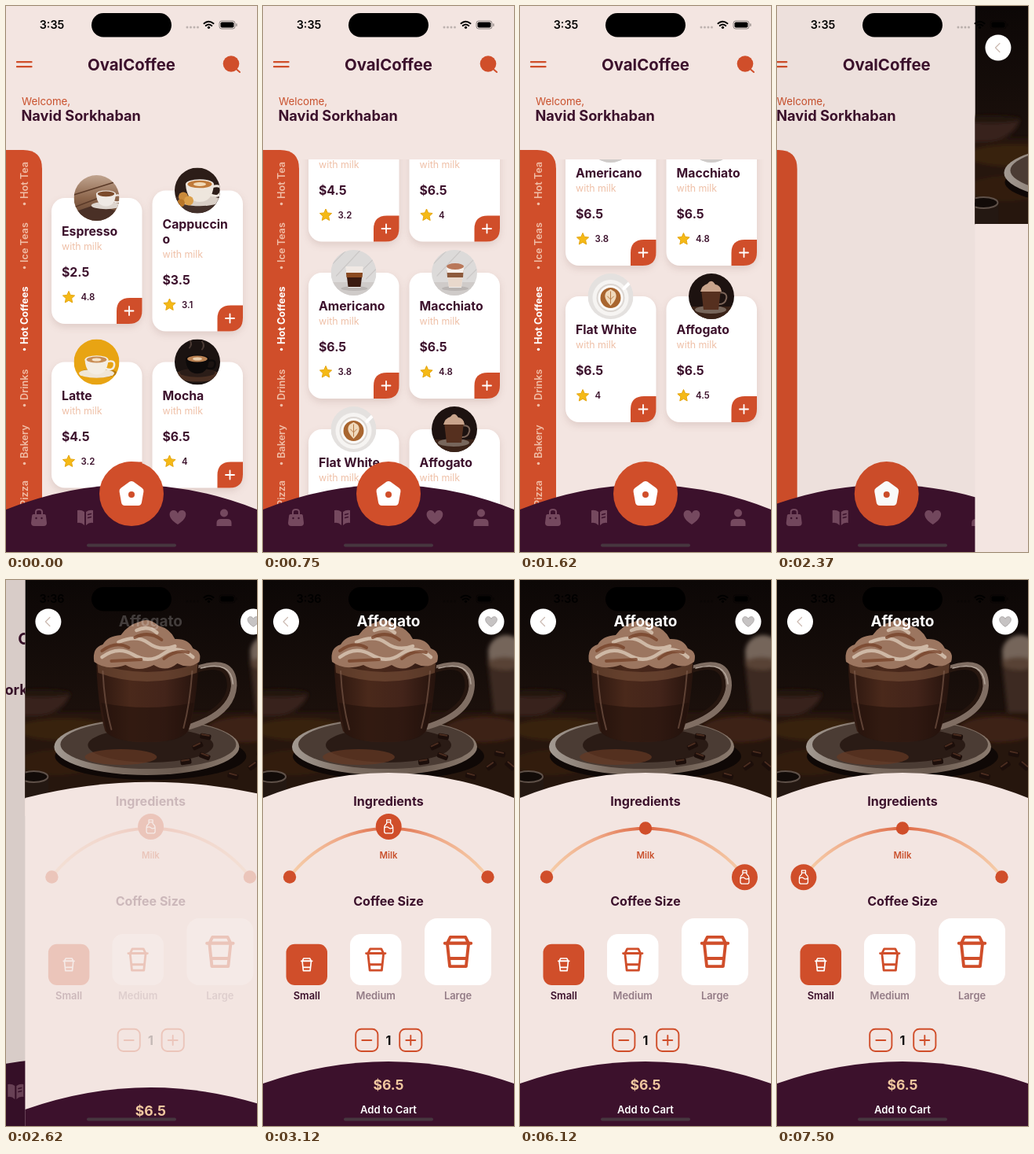
Animation of 320x694 px, one loop 8 s. Source, as an HTML page:

```html
<!DOCTYPE html>
<html lang="en">
<head>
<meta charset="utf-8">
<title>Coffee shop app</title>
<style>
html, body { margin: 0; width: 100%; height: 100%; overflow: hidden; background: #f3e5e1; }
svg { display: block; width: 100vw; height: 100vh; font-family: Inter, "Open Sans", sans-serif; }
.card { filter: drop-shadow(0 4px 5px rgba(90, 40, 30, .13)); }
.line { fill: none; stroke-linecap: round; stroke-linejoin: round; }
</style>
</head>
<body>
<svg id="stage" viewBox="0 0 320 694" xmlns="http://www.w3.org/2000/svg"></svg>
<script>
const LOOP = 8000, STEP = 125;
const PINK = '#f3e5e1', ORANGE = '#d04e2a', PLUM = '#3c112c', PEACH = '#efc0a8';

const text = (x, y, str, size, weight, fill, anchor = 'start', id = '') =>
  `<text ${id && `id="${id}"`} x="${x}" y="${y}" font-size="${size}" font-weight="${weight}" fill="${fill}" text-anchor="${anchor}">${str}</text>`;
const rect = (x, y, w, h, r, fill, more = '') =>
  `<rect x="${x}" y="${y}" width="${w}" height="${h}" rx="${r}" fill="${fill}" ${more}/>`;
const circle = (x, y, r, fill, more = '') => `<circle cx="${x}" cy="${y}" r="${r}" fill="${fill}" ${more}/>`;
const oval = (x, y, rx, ry, fill, more = '') =>
  `<ellipse cx="${x}" cy="${y}" rx="${rx}" ry="${ry}" fill="${fill}" ${more}/>`;
const shape = (d, fill, more = '') => `<path d="${d}" fill="${fill}" ${more}/>`;
const line = (d, color, width, more = '') =>
  `<path class="line" d="${d}" stroke="${color}" stroke-width="${width}" ${more}/>`;
const at = (x, y, inner, more = '') => `<g transform="translate(${x} ${y}) ${more}">${inner}</g>`;
const gradient = (id, dir, ...stops) => `<linearGradient id="${id}" ${dir}>` + stops.map((c, i) =>
  `<stop offset="${i / (stops.length - 1)}" stop-color="${c}"/>`).join('') + '</linearGradient>';

// Small pictures, drawn around 0,0 in a disc of radius 29
const cup = (x, y, s, body, coffee, plate) => at(x, y,
  oval(0, 10, 18, 4.5, plate) +
  line('M11 -2q8 -2 7 4t-9 3', body, 2) +
  shape('M-12 -4Q-11 11 0 11T12 -4z', body) +
  oval(0, -4, 12, 4.2, body) + oval(0, -4, 10.3, 3.2, coffee), `scale(${s})`);
const glass = (low, mid, foam) =>
  oval(1, 20, 17, 3, '#b9b4b2') +
  shape('M-10 -7H12L9 19H-7z', '#eeeceb') +
  shape('M-9.4 -1H11.4L9 18H-7z', low) +
  shape('M-9.6 -3H11.6L11 6H-9z', mid) +
  shape('M-10 -8H12L11.5 0H-9.5z', foam);
const wall = rect(-29, -29, 58, 58, 0, '#dcdad9') + rect(-29, 12, 58, 17, 0, '#cfcbc9') +
  line('M-26 -12L-10 -28M-22 4L8 -28M12 -4L28 -20M16 8L28 -4', '#cbc8c7', 1.2);
const art = {
  Espresso: rect(-29, -29, 58, 58, 0, 'url(#wood)') +
    line('M-29 -4L29 -22M-29 12L8 -2M-24 24L10 9', '#5b3a28', 1.5) +
    shape('M-29 18L0 8L29 18V29H-29z', '#4a3026') + cup(12, -1, 1.05, '#efe9e4', '#7b4a2b', '#ddd5ce'),
  Cappuccino: rect(-29, -29, 58, 58, 0, '#2c1d18') + rect(-29, 8, 58, 21, 0, '#43302a') +
    cup(3, -2, 1.5, '#eee6dd', '#c07a3a', '#d9cfc6') + oval(3, -8, 8, 2.5, '#f1d9b6') +
    circle(-18, 8, 6, '#c98a3b') + circle(-11, 13, 6, '#dba04b') + circle(-21, 16, 5, '#b87629'),
  Latte: rect(-29, -29, 58, 58, 0, '#e8a413') + oval(2, 14, 24, 6, '#b97c0d') +
    cup(0, 2, 1.25, '#f4ede2', '#c98e55', '#f0e6d6') + oval(0, -3, 6, 2, '#f5e3c8'),
  Mocha: rect(-29, -29, 58, 58, 0, '#1b1311') + oval(0, 17, 29, 8, '#4a2f22') +
    line('M-10 -18q4 -5 0 -10M6 -16q4 -5 0 -10', '#4a3a34', 2) +
    cup(0, 1, 1.25, '#0d0a0a', '#b98152', '#2b1d18') + oval(0, -4, 6, 2, '#e9cfae'),
  Americano: wall + glass('#3a1a10', '#8b4a20', '#f0e9e4'),
  Macchiato: wall + glass('#e8d8cc', '#8d5a3c', '#f6f0ec') + oval(1, -8, 11, 4, '#b9785a'),
  'Flat White': rect(-29, -29, 58, 58, 0, '#e4e1df') + circle(0, 2, 23, '#f6f4f2') +
    line('M17 -10l9 -9', '#fff', 4) + circle(0, 2, 18, '#dcd7d3') + circle(0, 2, 16, '#fbfaf9') +
    circle(0, 2, 13, '#a9652f') + shape('M0 12Q-11 1 -5 -6L0 -9L5 -6Q11 1 0 12', '#f0d9bb') +
    line('M0 -6V9M-4 0l4 4l4 -4', '#b87a45', 1),
  Affogato: rect(-29, -29, 58, 58, 0, '#1d1210') + rect(-29, 13, 58, 16, 0, '#3b2318') +
    oval(-1, 17, 20, 5, '#77665b') + line('M10 -5q11 0 9 8t-11 7', '#7b6458', 2) +
    shape('M-13 -9H12L9 17H-10z', '#56301f') + shape('M-14 -6Q-12 -14 -5 -16Q0 -23 5 -15Q12 -14 13 -6z', '#c9a48c')
};

const starPath = 'M' + Array.from({ length: 10 }, (_, i) => {
  const r = i % 2 ? 3.8 : 8, a = i * Math.PI / 5;
  return (r * Math.sin(a)).toFixed(2) + ' ' + (-r * Math.cos(a)).toFixed(2);
}).join('L') + 'z';

function card(x, y, lines, price, rating) {
  const extra = (lines.length - 1) * 19, top = y - extra / 2, h = 160 + extra;
  return at(x, top,
    rect(0, 0, 115.5, h, 17, '#fff', 'class="card"') +
    at(0, h, shape('M83 0V-16Q83 -33 100 -33H115.5V-17Q115.5 0 98.5 0z', ORANGE) +
      line('M93.5 -16.5h11M99 -22v11', '#fff', 1.8)) +
    `<g transform="translate(57.5 0)" clip-path="url(#disc)">${art[lines.join('')]}</g>` +
    lines.map((s, i) => text(13, 48 + i * 19, s, 15.8, 700, PLUM)).join('') +
    at(13, extra,
      text(0, 66, 'with milk', 12.4, 400, PEACH) +
      text(0, 100, price, 15.8, 700, PLUM) +
      at(9, 126.5, shape(starPath, '#f5b916', 'stroke="#e5a610" stroke-width="1" stroke-linejoin="round"')) +
      text(24.5, 130, rating, 11.4, 600, PLUM)));
}

const menu = [
  [['Espresso'], '$2.5', '4.8'], [['Cappuccin', 'o'], '$3.5', '3.1'],
  [['Latte'], '$4.5', '3.2'], [['Mocha'], '$6.5', '4'],
  [['Americano'], '$6.5', '3.8'], [['Macchiato'], '$6.5', '4.8'],
  [['Flat White'], '$6.5', '4'], [['Affogato'], '$6.5', '4.5']
];
const rows = [244, 452.5, 652, 851];
const cards = menu.map((m, i) => card(i % 2 ? 186.5 : 58, rows[i >> 1], ...m)).join('');

const tabs = [['Hot Tea', 245], ['Ice Teas', 326], ['Hot Coffees', 430], ['Drinks', 501], ['Bakery', 575], ['Pizza', 636]]
  .map(([name, y]) => {
    const on = name === 'Hot Coffees', color = on ? '#fff' : '#f0bda6';
    return at(28, y, text(0, 0, name, 12.7, on ? 700 : 600, color), 'rotate(-90)') + circle(23.5, y + 6.5, 1.8, color);
  }).join('');

const heart = 'M0 9C-16 -1 -10 -10 -5 -9Q-1.5 -9 0 -5Q1.5 -9 5 -9C10 -10 16 -1 0 9z';
const faded = '#75495f';
const nav = shape('M0 640Q160 577 320 640V694H0z', PLUM) +
  at(42, 650,
    shape('M-7 -4H7Q9 -4 9 -1L10 7Q10 11 6 11H-6Q-10 11 -10 7L-9 -1Q-9 -4 -7 -4', faded) +
    line('M-4 -4V-7Q-4 -10 0 -10T4 -7V-4', faded, 2) +
    circle(-3.5, 1, 1.2, PLUM) + circle(3.5, 1, 1.2, PLUM)) +
  at(101, 650,
    shape('M-1 -7Q-5 -10 -10 -9V7Q-5 6 -1 10zM1 -7Q5 -10 10 -9V7Q5 6 1 10z', faded) +
    line('M3.5 -3.5L7.5 -4.5M3.5 .5L7.5 -.5', PLUM, 1.3)) +
  at(219, 650, shape(heart, faded)) +
  at(278, 650, circle(0, -5.5, 5, faded) + shape('M-9.5 11V7Q-9.5 2 -4 2H4Q9.5 2 9.5 7V11z', faded)) +
  circle(160, 620, 41, ORANGE) +
  shape('M160 608.5L171 616.5L168.5 630.5H151.5L149 616.5z', '#fff', 'stroke="#fff" stroke-width="9" stroke-linejoin="round"') +
  circle(160, 621, 4, ORANGE);

const home = rect(0, 0, 320, 694, 0, PINK) +
  `<g id="listBox" clip-path="url(#listClip)"><g id="list">${cards}</g></g>` +
  shape('M0 183H22Q46 183 46 207V694H0z', ORANGE) + `<g id="tabs">${tabs}</g>` +
  line('M14 71.2H32.5M14 77.2H32.5', ORANGE, 2.3) +
  text(160, 82, 'OvalCoffee', 20.4, 700, PLUM, 'middle') +
  circle(287, 73.5, 10.3, ORANGE) + line('M294.5 81L298 84', ORANGE, 2) +
  text(20, 126, 'Welcome,', 13.3, 400, '#c9502c') +
  text(19.5, 146, 'Navid Sorkhaban', 18.2, 700, PLUM) + nav;

const bean = (x, y, a) => at(x, y, rect(-7, -3.5, 14, 7, 2, '#1c0e0a') + rect(-6, -3, 11, 2, 1, '#4a2c1f'), `rotate(${a})`);
const room = rect(-10, 168, 340, 120, 0, '#25140d') +
  oval(50, 190, 60, 14, '#38200f') + oval(282, 190, 50, 16, '#3c2113') + oval(40, 232, 50, 16, '#321c11') +
  shape('M-12 144H58Q48 170 16 172H-12z', '#37211a') + oval(20, 144, 38, 5, '#21130d') +
  shape('M286 98H330V168H294z', '#3d2c23') + oval(310, 92, 23, 22, '#75655a') + oval(308, 106, 21, 8, '#594234');
const saucer = oval(160, 224, 122, 30, '#0f0806') +
  oval(155, 212, 118, 36, 'url(#china)') + oval(157, 209, 112, 31, '#4b3c34') +
  oval(160, 210, 80, 22, '#2a1b15') + oval(122, 225, 46, 10, '#673a24', 'opacity=".7"');
const mug = line('M216 114Q266 96 266 134Q264 170 210 186', '#806e63', 8) +
  line('M217 116Q260 101 260 135Q257 164 211 180', '#26160f', 5) +
  line('M224 112Q263 102 265 132', '#b5a79c', 1.5) +
  shape('M90 90H222Q219 160 208 192Q196 206 155 206T102 192Q92 160 90 90z', 'url(#cocoa)') +
  shape('M92 106Q155 128 220 106L219 118Q155 140 93 118z', '#795039', 'opacity=".6"') +
  shape('M97 156Q155 168 215 156Q210 190 205 195Q195 206 155 206T104 194z', '#1f0f0a', 'opacity=".55"') +
  line('M99 116Q101 158 110 190M213 116Q210 158 202 188', '#80604f', 2, 'opacity=".6"');
const cream = shape('M88 104Q85 86 99 82Q105 71 122 70Q131 57 146 53Q158 47 170 58Q185 62 191 75Q208 74 214 87Q226 91 222 104Q209 114 194 106Q180 118 164 108Q145 118 128 108Q104 116 88 104z', '#9c7660') +
  line('M98 98Q118 83 138 95T176 94T214 98M119 79Q142 69 157 80T191 84M142 64Q157 57 168 67', '#d8c4b2', 4.5, 'opacity=".85"') +
  line('M98 90Q116 77 132 86M140 73Q158 64 174 76M177 100Q192 88 208 92M110 103L148 101', '#753f26', 4, 'opacity=".75"');
const hero = '<g clip-path="url(#heroClip)">' + rect(0, 0, 320, 278, 0, 'url(#night)') +
  `<g filter="url(#soft)">${room}</g>` +
  shape('M-4 250V280H30V250z', '#241812') + oval(11, 250, 18, 7, '#120b08', 'stroke="#5e5048" stroke-width="2"') +
  saucer + mug + cream +
  bean(230, 199, 10) + bean(220, 211, -25) + bean(205, 231, -8) + bean(229, 224, 20) +
  bean(291, 236, -35) + bean(302, 221, 12) + bean(265, 249, 15) + bean(315, 236, 40) + '</g>';

const takeaway = (x, y, s, color) => at(x, y,
  line('M-5.2 -10H5.2L7.2 -6H-7.2zM-9 -5.8H9M-7.3 -5.8L-5.6 10H5.6L7.3 -5.8M-6.2 4.6H6.2', color, 2.1), `scale(${s})`);
const sizeCard = (x, y, w, r, fill, ink, s, name, color) =>
  rect(x, y, w, 515 - y, r, fill) + takeaway(x + w / 2, (y + 515) / 2, s, ink) +
  text(x + w / 2, 533, name, 12.9, 600, color, 'middle');
const stepper = (x, d) => rect(x, 570.8, 28.2, 28.2, 7, 'none', `stroke="${ORANGE}" stroke-width="1.9"`) +
  at(x + 14.1, 585, line(d, ORANGE, 1.9));

const content = text(160, 287, 'Ingredients', 16.1, 700, PLUM, 'middle') +
  line('M34 377.5A160 160 0 0 1 286.5 377.5', 'url(#arc)', 4) +
  circle(34, 377.5, 8.2, ORANGE) + circle(160, 315.5, 8.2, ORANGE) + circle(286.5, 377.5, 8.2, ORANGE) +
  '<g id="thumb">' + circle(0, 0, 16.5, ORANGE) +
  line('M-2.5 -8.5H2.5V-5.5H-2.5zM-2.5 -5.5V-4Q-5.5 -1.5 -5.5 1V6Q-5.5 8.5 -3 8.5H3Q5.5 8.5 5.5 6V1Q5.5 -1.5 2.5 -4V-5.5M-5.3 1.5Q-2 -.5 0 1.5T5.3 1.5', '#fff', 1.3) + '</g>' +
  text(160, 354, 'Milk', 11.4, 600, '#c9502c', 'middle') +
  text(160, 414, 'Coffee Size', 16, 700, PLUM, 'middle') +
  sizeCard(29.5, 462.7, 52.5, 11, ORANGE, '#fff', .78, 'Small', PLUM) +
  sizeCard(111, 450, 65.5, 14, '#fff', ORANGE, 1.36, 'Medium', '#937b86') +
  sizeCard(206, 430, 85, 16, '#fff', ORANGE, 1.86, 'Large', '#937b86') +
  stepper(118.2, 'M-6 0H6') + stepper(174.2, 'M-6 0H6M0 -6V6') +
  text(160, 590.5, '1', 16, 700, '#111', 'middle');

const detail = rect(0, 0, 320, 694, 0, PINK) + hero +
  `<path id="panel" fill="${PINK}"/>` +
  `<g id="content">${content}</g>` +
  text(160, 59, 'Affogato', 19, 700, '#fff', 'middle', 'title') +
  circle(29.5, 53, 16.5, '#fff') + line('M31.5 47.5L26 53L31.5 58.5', '#cbb9b0', 1.2) +
  circle(291, 53, 16.5, '#fff') + at(291, 53, shape(heart, '#c6c3c3', 'stroke="#aaa6a6" stroke-width="1.4" transform="scale(.7)"')) +
  '<g id="cart">' + shape('M0 640Q160 584 320 640V700H0z', PLUM) +
  text(160, 648, '$6.5', 17.6, 700, '#f0c79f', 'middle') +
  text(160, 678, 'Add to Cart', 13.1, 600, '#fff', 'middle') + '</g>';

const status = text(58.5, 29, '3:35', 14.3, 600, '#000', 'middle', 'clock') +
  rect(109, 9, 102, 30.5, 15.2, '#000') +
  [231, 235.5, 240, 244.5].map(x => circle(x, 27, 1.5, '#000', 'opacity=".22"')).join('') +
  line('M252.5 22.2Q258.5 17.2 264.5 22.2M254.8 25Q258.5 22 262.2 25', '#000', 2) + circle(258.5, 27.3, 1.6, '#000') +
  rect(272, 19, 20, 10, 3, 'none', 'stroke="#000" stroke-opacity=".42"') + rect(273.5, 20.5, 17, 7, 1.8, '#000') +
  rect(293.3, 22.2, 1.3, 3.6, .6, '#000', 'opacity=".42"') +
  rect(103, 683.5, 114, 4, 2, '#47363f');

document.getElementById('stage').innerHTML = '<defs>' +
  gradient('wood', 'x2="0" y2="1"', '#c0a48f', '#8d664c', '#5c3d2d') +
  gradient('night', 'x2="0" y2="1"', '#0c0706', '#140c09', '#1d110c', '#140b08') +
  gradient('cocoa', '', '#2a150e', '#4a291b', '#43241a', '#24120c') +
  gradient('china', '', '#a39a92', '#7b6c61', '#6b5b50', '#8b7b6f') +
  gradient('arc', '', '#f6cfab', '#efa987', '#dd6642', '#efa987', '#f6cfab') +
  '<clipPath id="disc"><circle r="29"/></clipPath>' +
  '<clipPath id="heroClip"><rect width="320" height="277.5"/></clipPath>' +
  '<clipPath id="listClip"><rect x="46" y="195" width="274" height="499"/></clipPath>' +
  '<filter id="soft"><feGaussianBlur stdDeviation="2.5"/></filter></defs>' +
  `<g id="home">${home}</g>` + rect(0, 0, 320, 694, 0, '#000', 'id="shade"') +
  `<g id="detail">${detail}</g>` + status;

const el = {};
document.querySelectorAll('svg [id]').forEach(n => el[n.id] = n);

const clamp = u => Math.max(0, Math.min(1, u));
const span = (t, a, b) => clamp((t - a) / (b - a));
const easeOut = u => 1 - (1 - u) ** 3;
const easeInOut = u => u * u * (3 - 2 * u);
const move = (n, x, y) => n.setAttribute('transform', `translate(${x.toFixed(2)} ${y.toFixed(2)})`);
const show = (n, on) => n.setAttribute('visibility', on ? 'visible' : 'hidden');

// A flick that slows down and settles at the end of the list
const flick = [[375, 0], [500, 60], [625, 190], [750, 313], [875, 405], [1000, 460], [1125, 481.5], [1250, 484], [1625, 482]];
function scrollAt(t) {
  const i = flick.findIndex(k => k[0] > t);
  if (i === 0) return 0;
  if (i < 0) return flick[flick.length - 1][1];
  const [a, p] = flick[i - 1], [b, q] = flick[i];
  return p + (q - p) * (t - a) / (b - a);
}

function draw(t) {
  const pushed = t >= 2337;
  const push = easeOut(span(t, 2337, 2837));
  const enter = easeOut(span(t, 2437, 3100));
  const fade = span(t, 2500, 3100);

  move(el.list, 0, -scrollAt(t));
  show(el.listBox, !pushed);
  show(el.tabs, !pushed);
  move(el.home, -96 * push, 0);
  el.shade.setAttribute('opacity', .12 * push);

  show(el.detail, pushed);
  move(el.detail, 320 * (1 - push), 0);
  el.panel.setAttribute('d', `M0 277Q160 ${277 - 64 * enter} 320 277V300H0z`);
  el.content.setAttribute('opacity', fade);
  el.title.setAttribute('opacity', fade);
  move(el.cart, 0, 90 * (1 - enter));

  const right = easeInOut(span(t, 5375, 6125)), left = easeInOut(span(t, 6625, 7500));
  const angle = (right - 2 * left) * 52.1 * Math.PI / 180;
  move(el.thumb, 160.2 + 160 * Math.sin(angle), 480 - 166.6 * Math.cos(angle));

  el.clock.textContent = t < 2500 ? '3:35' : '3:36';
}

// The picture advances in even steps of an eighth of a second
const start = performance.now();
function tick() {
  const t = (performance.now() - start) % LOOP;
  draw(Math.floor((t + 5) / STEP) * STEP % LOOP);
  requestAnimationFrame(tick);
}
draw(0);
tick();
</script>
</body>
</html>
```
